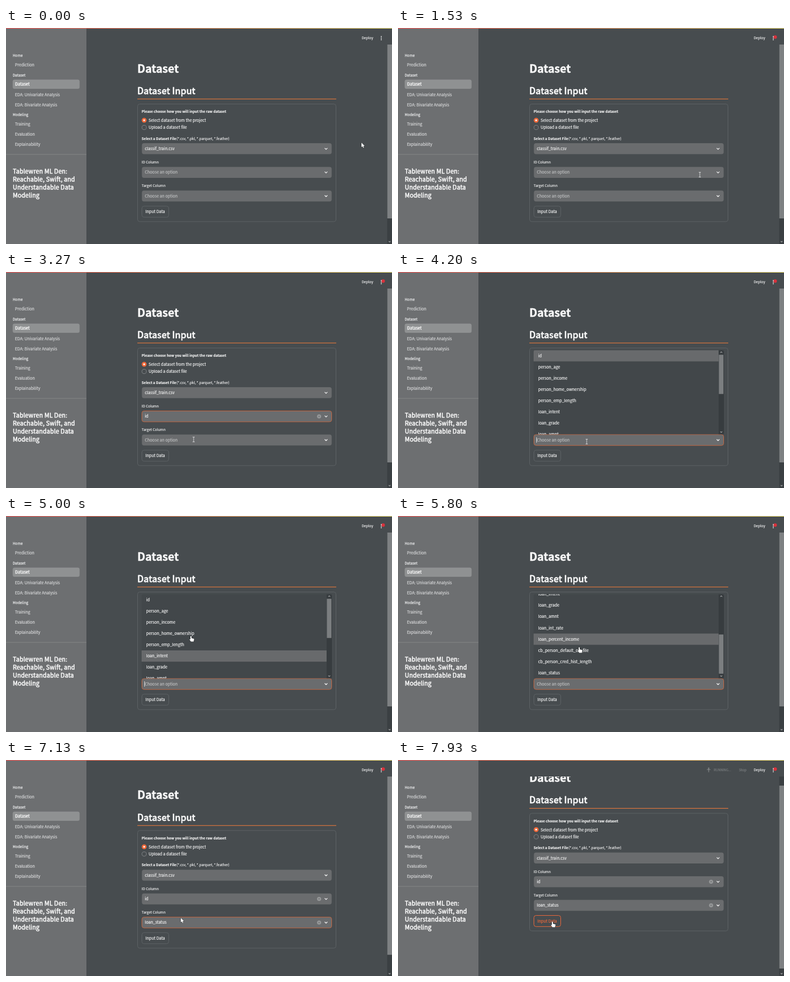
An HTML page with a canvas for the animation above (8000 ms loop, 720x405 px).

```html
<!DOCTYPE html>
<html lang="en">
<head>
<meta charset="utf-8">
<title>Dataset input</title>
<style>
html, body { margin: 0; width: 100%; height: 100%; overflow: hidden; background: #474c4f; }
canvas { display: block; width: 720px; height: 405px; }
</style>
</head>
<body>
<canvas id="stage"></canvas>
<script>
const canvas = document.getElementById('stage');
const c = canvas.getContext('2d');
const ratio = window.devicePixelRatio || 1;
canvas.width = 720 * ratio;
canvas.height = 405 * ratio;

const LOOP = 8000;
const BG = '#474c4f', SIDE = '#6d6f71', FIELD = '#6a6c6e', ACCENT = '#f0693a';
const WHITE = '#fafafa', SOFT = '#dddedf', MUTED = '#c0c2c3', EDGE = '#5d6265';
const FOCUS = '#c4653f';
const BODY = 7.49, SMALL = 6.55;
const ID_Y = 270.7, TARGET_Y = 315, LIST_H = 158, ROW = 21.1, LIST_MAX = 116;

const columns = ['id', 'person_age', 'person_income', 'person_home_ownership',
  'person_emp_length', 'loan_intent', 'loan_grade', 'loan_amnt', 'loan_int_rate',
  'loan_percent_income', 'cb_person_default_on_file', 'cb_person_cred_hist_length',
  'loan_status'];

// Pointer hot spot: [time, x, y]
const path = [[0, 663, 215], [670, 663, 215], [1400, 563, 275], [1560, 563, 275],
  [1800, 380, 272], [1880, 378, 270], [2180, 351, 119], [2650, 351, 119],
  [3270, 350, 314], [3530, 352, 318], [4700, 352, 318], [5000, 345, 225],
  [5600, 342, 228], [5800, 338, 246], [6000, 327, 288], [6400, 326, 296],
  [7400, 326, 296], [7700, 288, 303], [LOOP, 288, 303]];

const clamp = (v, lo, hi) => Math.min(hi, Math.max(lo, v));
function ease(t, from, to) {
  const u = clamp((t - from) / (to - from), 0, 1);
  return u * u * (3 - 2 * u);
}
function pointer(t) {
  const i = Math.max(1, path.findIndex(p => p[0] > t));
  const [t0, x0, y0] = path[i - 1], [t1, x1, y1] = path[i];
  const u = ease(t, t0, t1);
  return [x0 + (x1 - x0) * u, y0 + (y1 - y0) * u];
}

// y is the middle of the capital letters
function text(s, x, y, size = BODY, color = WHITE, weight = 400) {
  const semi = weight === 600;
  c.font = `${semi ? 400 : weight} ${size}px "Noto Sans CJK JP", "Noto Sans CJK SC", "Noto Sans", sans-serif`;
  c.letterSpacing = semi ? size * 0.013 + 'px' : '0px';
  c.fillStyle = c.strokeStyle = color;
  c.lineWidth = size * (semi ? 0.05 : 0.02);
  c.fillText(s, x, y + size * 0.365);
  c.strokeText(s, x, y + size * 0.365);
}
function rect(x, y, w, h, color) {
  c.fillStyle = color;
  c.fillRect(x, y, w, h);
}
function box(x, y, w, h, r, fill, stroke) {
  c.beginPath();
  c.roundRect(x, y, w, h, r);
  if (fill) { c.fillStyle = fill; c.fill(); }
  if (stroke) { c.strokeStyle = stroke; c.lineWidth = 1; c.stroke(); }
}
function dot(x, y, r, color) {
  c.fillStyle = color;
  c.beginPath();
  c.arc(x, y, r, 0, 7);
  c.fill();
}
function line(points, color, width) {
  c.strokeStyle = color;
  c.lineWidth = width;
  c.beginPath();
  points.forEach(([x, y]) => c.lineTo(x, y));
  c.stroke();
}
function chevron(x, y, w, color, up = 1) {
  line([[x - w, y - w / 2 * up], [x, y + w / 2 * up], [x + w, y - w / 2 * up]], color, 1.2);
}

function select(y, value, focused, caret, clearable) {
  box(253.5, y - 10.2, 354, 20.4, 4, FIELD, focused ? FOCUS : null);
  text(value || 'Choose an option', 259, y, BODY, value ? WHITE : MUTED);
  if (caret) rect(258, y - 5, 0.8, 10, WHITE);
  if (value && clearable) {
    dot(584, y, 3.8, '#97999a');
    line([[582.6, y - 1.4], [585.4, y + 1.4]], FIELD, 0.9);
    line([[585.4, y - 1.4], [582.6, y + 1.4]], FIELD, 0.9);
  }
  chevron(597, y, 2.5, WHITE);
}

function dropdown(top, scroll, hovered) {
  c.save();
  c.beginPath();
  c.roundRect(253, top, 355, LIST_H, 3);
  c.clip();
  rect(253, top, 355, LIST_H, '#42474a');
  columns.forEach((name, i) => {
    const y = top + i * ROW - scroll;
    if (i === hovered) rect(253, y, 345, ROW, '#686a6c');
    text(name, 261.5, y + ROW / 2);
  });
  rect(598, top, 10, LIST_H, '#373c3f');
  rect(598.5, top + 8.7 + scroll / LIST_MAX * 67, 8.5, 73.5, '#7b7e80');
  chevron(603, top + 4, 1.8, '#a0a2a3', -1);
  chevron(603, top + LIST_H - 4.5, 1.8, '#a0a2a3');
  c.restore();
}

function sidebar() {
  rect(0, 0, 150, 405, SIDE);
  [['Home', 52], ['Dataset', 89], ['Modeling', 163]]
    .forEach(([s, y]) => text(s, 12.5, y, SMALL, SOFT, 600));
  box(12.5, 96.8, 124.8, 17.2, 3.5, '#8f9192');
  text('Dataset', 17, 105.7, BODY, WHITE, 600);
  [['Prediction', 69.3], ['EDA: Univariate Analysis', 125], ['EDA: Bivariate Analysis', 143.8],
    ['Training', 180.5], ['Evaluation', 199.2], ['Explainability', 218]]
    .forEach(([s, y]) => text(s, 16.7, y, BODY, SOFT));
  rect(0, 236.5, 150, 1, '#858788');
  ['Tablewren ML Den:', 'Reachable, Swift, and', 'Understandable Data', 'Modeling']
    .forEach((s, i) => text(s, 12.7, 268.5 + i * 15.1, 11.25, WHITE, 600));
}

function form(t, overButton) {
  text('Dataset', 245, 76.2, 20.6, WHITE, 700);
  text('Dataset Input', 245, 117.7, 16.84, WHITE, 600);
  rect(245, 132.5, 371, 1.2, '#e0763c');
  box(245.5, 142.5, 370, 220.5, 4, null, EDGE);
  text('Please choose how you will input the raw dataset', 253, 157, SMALL, WHITE, 700);
  dot(257.7, 173, 4.5, ACCENT);
  dot(257.7, 173, 1.7, WHITE);
  c.beginPath();
  c.arc(257.7, 186.5, 4.1, 0, 7);
  c.strokeStyle = '#8b8e90';
  c.lineWidth = 0.9;
  c.stroke();
  text('Select dataset from the project', 266, 173.3);
  text('Upload a dataset file', 266, 186.7);
  text('Select a Dataset File', 253, 207.3, SMALL, WHITE, 700);
  text('(*.csv, *.pkl, *.parquet, *.feather)', 318, 207.3, SMALL);
  select(226.3, 'classif_train.csv');
  text('ID Column', 253, 251.7, SMALL);
  text('Target Column', 253, 296, SMALL);

  const idOpen = t >= 1800 && t < 2560, targetOpen = t >= 3870 && t < 6620;
  const blinkOn = since => (t - since) % 1000 < 500;
  select(ID_Y, t >= 2560 ? 'id' : '', t >= 1800 && t < 3830, idOpen && blinkOn(1800), true);
  select(TARGET_Y, t >= 6620 ? 'loan_status' : '', t >= 3870 && t < 7800,
    targetOpen && blinkOn(3870), true);
  box(253.5, 334, 50, 20.8, 4, null, overButton ? ACCENT : EDGE);
  text('Input Data', 260, 344.6, BODY, overButton ? ACCENT : WHITE);

  if (idOpen || targetOpen) {
    const top = idOpen ? 102.3 : 146.5;
    const scroll = LIST_MAX * ease(t, 5000, 5400);
    const y = pointer(t - 120)[1] - top;
    dropdown(top, scroll, y > 0 && y < LIST_H ? Math.floor((y + scroll) / ROW) : 0);
  }
}

function header(t, scroll) {
  rect(711, 31, 9, 374, '#3b4043');
  rect(711.3, 14 + 0.8 * scroll, 8.7, 343, '#7e8183');
  chevron(715.5, 400.5, 1.8, '#a0a2a3');
  rect(150, 0, 570, 31, BG);
  c.globalAlpha = 0.28 * ease(t, 7800, 7930);
  dot(579.5, 15.5, 1.5, WHITE);
  line([[576, 18], [583, 18]], WHITE, 1.2);
  line([[579.5, 17], [579.5, 23]], WHITE, 1.4);
  text('RUNNING...', 589, 19, 6, WHITE);
  text('Stop', 636, 19, SMALL, WHITE);
  c.globalAlpha = 1;
  text('Deploy', 663.5, 19, SMALL);
  c.globalAlpha = 0.9 * ease(t, 70, 470);
  dot(703.5, 17, 3.3, '#e5303a');
  c.globalAlpha = 1;
  [16, 19, 22].forEach(y => dot(700, y, 0.9, WHITE));
  const bar = c.createLinearGradient(0, 0, 720, 0);
  bar.addColorStop(0, '#ff4b4b');
  bar.addColorStop(1, '#fff078');
  rect(0, 0, 720, 1, bar);
}

const shapes = {
  arrow: new Path2D('M0 0V8.6L2 6.8L3.4 9.8L4.8 9.2L3.5 6.3H6.2Z'),
  hand: new Path2D('M-1 .8Q0-.6 1 .8V4L5 5Q6 5.3 5.8 6.6L5 10.5H0L-2.8 6.8Q-2.6 5.3-1 6.4Z')
};
function drawPointer(kind, x, y) {
  if (kind === 'beam') {
    line([[x - 2, y - 4.5], [x + 2, y - 4.5]], SOFT, 0.9);
    line([[x, y - 4.5], [x, y + 4.5]], SOFT, 0.9);
    line([[x - 2, y + 4.5], [x + 2, y + 4.5]], SOFT, 0.9);
    return;
  }
  c.save();
  c.translate(x, y);
  c.strokeStyle = '#202426';
  c.lineWidth = 1;
  c.stroke(shapes[kind]);
  c.fillStyle = '#fff';
  c.fill(shapes[kind]);
  c.restore();
}
function pointerKind(t, x, y, overButton) {
  const inList = top => x > 253 && x < 598 && y > top && y < top + LIST_H;
  if (overButton) return 'hand';
  if (t >= 1800 && t < 2560 && inList(102.3)) return 'hand';
  if (t >= 3870 && t < 6620 && inList(146.5)) return 'hand';
  const inField = mid => x > 253 && x < 608 && Math.abs(y - mid) < 10.5;
  return t < 6620 && (inField(ID_Y) || inField(TARGET_Y)) ? 'beam' : 'arrow';
}

function draw(t) {
  const scroll = 42.5 * ease(t, 7067, 7267);
  const [x, y] = pointer(t);
  const overButton = t > 7400 && x < 304;
  c.setTransform(ratio, 0, 0, ratio, 0, 0);
  c.lineJoin = 'round';
  rect(0, 0, 720, 405, BG);
  c.save();
  c.translate(0, -scroll);
  form(t, overButton);
  c.restore();
  sidebar();
  header(t, scroll);
  drawPointer(pointerKind(t, x, y, overButton), x, y);
}

function frame() {
  draw(performance.now() % LOOP);
  requestAnimationFrame(frame);
}
frame();
</script>
</body>
</html>
```
